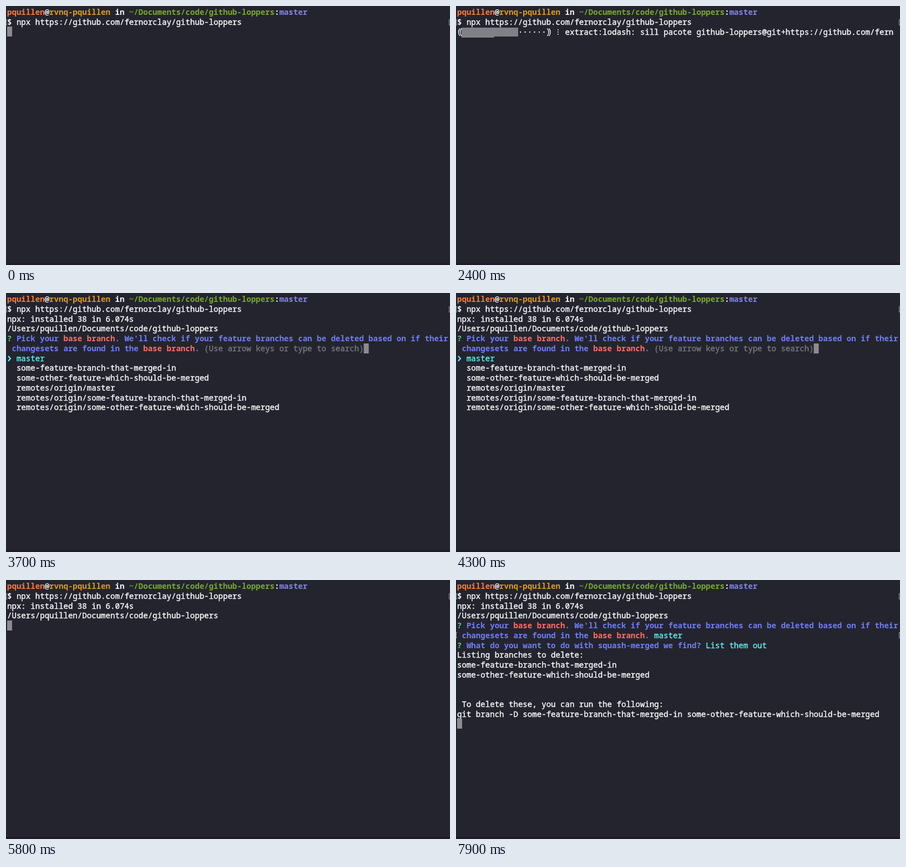
These frames come from a looping animation (800 px wide and 467 px high, 8000 ms). An HTML page with a canvas:

```html
<!DOCTYPE html>
<html lang="en">
<head>
<meta charset="utf-8">
<title>Terminal session</title>
<style>
html, body { margin: 0; width: 100%; height: 100%; overflow: hidden; background: #24242f; }
canvas { display: block; }
</style>
</head>
<body>
<canvas id="screen" width="800" height="467"></canvas>
<script>
const g = document.getElementById('screen').getContext('2d');
const LOOP = 8000, LEFT = 2, COL = 8.455, ROW = 17.73, COLS = 93;
const FACE = '14.09px "Noto Sans Mono", "DejaVu Sans Mono", monospace';
const BG = '#24242f', WHITE = '#fbfbfb';
// Tag letters in the text; a capital letter means bold.
const COLORS = {
  w: WHITE, o: '#fb7c3b', y: '#dc9c22', g: '#77aa2e', v: '#8585e6',
  b: '#6f7df6', r: '#ff6e67', c: '#60f2ef', q: '#58c879', d: '#78787d'
};

const user = 'pquillen';
const repo = 'https://github.com/fernorclay/github-loppers';
const merged = ['some-feature-branch-that-merged-in', 'some-other-feature-which-should-be-merged'];
const question = [
  "<Q>?<B> Pick your <R>base branch<B>. We'll check if your feature branches can be deleted based on if their",
  '<B> changesets are found in the <R>base branch<B>. '
];
const action = '<Q>?<B> What do you want to do with squash-merged we find? ';

const colX = c => LEFT + c * COL;
const rowY = r => 11.8 + r * ROW;

function print(row, text, col = 0) {
  const y = rowY(row) + 4.4;
  text.split(/<(\w)>/).forEach((part, i, all) => {
    if (i % 2) return;
    const tag = all[i - 1] || 'w', lower = tag.toLowerCase(), bold = tag !== lower;
    g.font = (bold ? 'bold ' : '') + FACE;
    g.fillStyle = g.strokeStyle = COLORS[lower];
    g.lineWidth = .4;
    for (const ch of part) {
      const x = colX(col++);
      g.fillText(ch, x, y);
      if (!bold) g.strokeText(ch, x, y); // medium weight
    }
  });
}

const printAll = (row, lines) => lines.forEach((line, i) => print(row + i, line));

function cursor(row, col = 0) {
  g.fillStyle = '#8d8b90';
  g.fillRect(colX(col), Math.round(rowY(row) - 9.8), 9, 18);
}

function stroke(color, width, draw) {
  g.strokeStyle = color;
  g.lineWidth = width;
  g.beginPath();
  draw();
  g.stroke();
}

function pointer(row) {
  const y = rowY(row);
  stroke(COLORS.c, 2.2, () => {
    g.moveTo(4, y - 4.5);
    g.lineTo(8, y);
    g.lineTo(4, y + 4.5);
  });
}

// Small prompt marks at both edges of the window
function marks(row) {
  const y = Math.round(rowY(row)) - .5;
  stroke('#9699ad', 1, () => {
    for (const x of [.5, 798.5]) {
      g.moveTo(x + 1.5, y - 5);
      g.lineTo(x, y - 5);
      g.lineTo(x, y + 5);
      g.lineTo(x + 1.5, y + 5);
    }
  });
}

function doubleParen(x, dir) {
  stroke(WHITE, 1.3, () => {
    for (const dx of [0, 3]) {
      g.moveTo(x + dir * (dx + 3.5), 40.5);
      g.quadraticCurveTo(x + dir * (dx - 1.8), 47.3, x + dir * (dx + 3.5), 54);
    }
  });
}

// Braille spinner: dot numbers of each step
const SPIN = ['124', '145', '1456', '456', '3456', '356', '236', '1236', '123', '1234'];
function spinner(t) {
  g.fillStyle = WHITE;
  for (const n of SPIN[(Math.floor(t / 80) + 8) % 10]) {
    const x = n > 3 ? 186.5 : 183, y = 42 + (n - 1) % 3 * 4;
    g.fillRect(x, y, 1.7, 1.7);
  }
}

function shade(x0, x1, y0, y1) {
  g.fillStyle = '#dcdcde';
  for (let y = y0; y < y1; y++)
    for (let x = x0 + (x0 + y) % 2; x < x1; x += 2) g.fillRect(x, y, 1, 1);
}

function progress(t, filled, text) {
  doubleParen(3.6, 1);
  doubleParen(171, -1);
  print(2, '·'.repeat(18 - filled), filled + 1);
  if (filled) {
    shade(10, Math.round(colX(filled + 1)), 39, 55);
    shade(10, 69, 55, 57);
  }
  spinner(t);
  print(2, text.slice(0, COLS - 23), 23);
}

function install(t) {
  const fetching = 'fetchMetadata: sill resolveWithNewModule github-loppers@1.0.0 checking';
  if (t < 700) cursor(2);
  else if (t < 1100) progress(t, 0, 'rollbackFailedOptional: verb npm-session 4c81e07ab25d936f');
  else if (t < 2200) progress(t, t < 2100 ? 0 : 7, fetching);
  else progress(t, 12, 'extract:lodash: sill pacote github-loppers@git+' + repo);
}

function pickBranch() {
  printAll(4, question);
  print(5, '<d>(Use arrow keys or type to search)', 42);
  cursor(5, 76);
  pointer(6);
  const remotes = ['master', ...merged].map(b => 'remotes/origin/' + b);
  printAll(6, ['<c>  master', ...[...merged, ...remotes].map(b => '  ' + b)]);
}

function chooseAction(t) {
  marks(5);
  printAll(4, [question[0], question[1] + '<c>master']);
  if (t < 7500) {
    pointer(7);
    printAll(6, [action + '<d>(Use arrow keys)', '<c>  List them out', '  Actually delete them']);
    return;
  }
  printAll(6, [
    action + '<c>List them out', 'Listing branches to delete:', ...merged, '', '',
    ' To delete these, you can run the following:', 'git branch -D ' + merged.join(' ')
  ]);
  cursor(14);
}

function render(t) {
  g.fillStyle = BG;
  g.fillRect(0, 0, 800, 467);
  g.fillStyle = '#221a2c';
  g.fillRect(0, 463, 800, 4);
  print(0, `<O>${user}<W>@<Y>rvnq-${user}<W> in <G>~/Documents/code/github-loppers<W>:<V>master`);
  print(1, '<W>$<w> npx ' + repo);
  marks(1);
  if (t < 2600) return install(t);
  print(2, 'npx: installed 38 in 6.074s');
  if (t < 3000) return cursor(3);
  print(3, `/Users/${user}/Documents/code/github-loppers`);
  if (t >= 6500) chooseAction(t);
  else if (t >= 3200 && t < 4800) pickBranch();
  else cursor(4);
}

const start = performance.now();
function frame() {
  render((performance.now() - start) % LOOP);
  requestAnimationFrame(frame);
}
frame();
</script>
</body>
</html>
```
